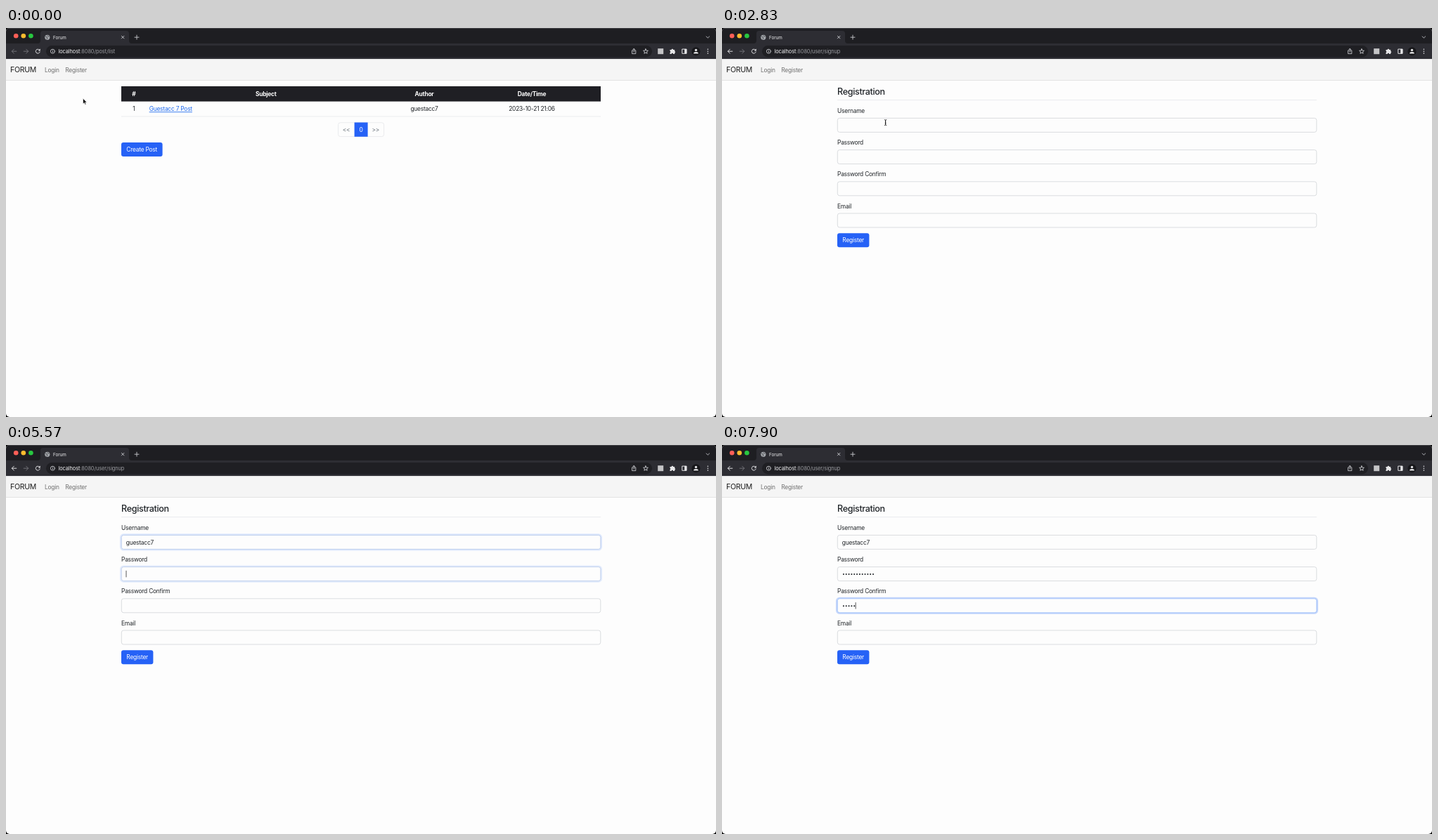
Recreate the animation shown at these times as an HTML page. Size 1010 by 554 pixels, loop 8 s.

```html
<!DOCTYPE html>
<html lang="en">
<head>
<meta charset="utf-8">
<title>Forum</title>
<style>
html, body { margin: 0; width: 100%; height: 100%; overflow: hidden; background: #000; }
svg { display: block; width: 1010px; height: 554px; }
text { font: 8.42px Inter, "Liberation Sans", sans-serif; letter-spacing: -.028em; fill: #212529; white-space: pre; }
.mid { text-anchor: middle; }
.head { font-weight: 700; fill: #fff; }
.ui { font-size: 6.3px; letter-spacing: 0; fill: #f1f1f3; }
.url { font-size: 7.36px; letter-spacing: -.01em; fill: #9b9ca1; }
.nav { fill: #717171; }
.brand { font-size: 10.52px; fill: #1c1c1c; }
.title { font-size: 12.6px; font-weight: 500; }
.btn { fill: #fff; }
.line { fill: none; stroke: #dee0e3; stroke-width: .6; }
.icon { fill: none; stroke: #c9cace; stroke-width: .9; stroke-linecap: round; stroke-linejoin: round; }
</style>
</head>
<body>
<svg viewBox="0 0 1010 554">
  <defs><clipPath id="win"><rect width="1010" height="554" rx="5"/></clipPath></defs>
  <g clip-path="url(#win)">
    <rect width="1010" height="554" fill="#fdfdfd"/>

    <!-- browser frame -->
    <rect width="1010" height="23" fill="#1e1e22"/>
    <path d="M4 .4H1006" stroke="#55565a" stroke-width=".8"/>
    <rect y="22" width="1010" height="22.3" fill="#2d2d33"/>
    <path d="M45 22q4 0 4-4V8q0-4 4-4h118q4 0 4 4v10q0 4 4 4z" fill="#2d2d33"/>
    <circle cx="14.2" cy="11.3" r="3.3" fill="#ff5f57"/>
    <circle cx="24.8" cy="11.3" r="3.3" fill="#febc2e"/>
    <circle cx="35.4" cy="11.3" r="3.3" fill="#28c840"/>
    <g id="globe">
      <circle cx="58.8" cy="13.3" r="3.6" fill="#a3a6ab"/>
      <path d="M56.2 12.2l2 .8.6 1.6-1 1.6M58.6 10.6l1.2 1.2 1.6.2" fill="none" stroke="#3a3b40" stroke-width=".9"/>
    </g>
    <text class="ui" x="67" y="15.5">Forum</text>
    <path class="icon" d="M164.4 11.3l3.6 3.6m0-3.6l-3.6 3.6" stroke="#fff"/>
    <path class="icon" d="M183 13.2h6m-3-3v6" stroke="#fff"/>
    <path class="icon" d="M996.2 12l2.2 2.2 2.2-2.2" stroke="#fff"/>
    <path class="icon" id="back" d="M14.8 33.2H8.4m2.9-3l-3 3 3 3"/>
    <path class="icon" d="M25.2 33.2h6.4m-2.9-3l3 3-3 3" style="stroke:#77787d"/>
    <g id="reload">
      <path class="icon" d="M47.6 31.2A3 3 0 1 0 48.2 34" style="stroke:#f0f0f2"/>
      <path d="M48.7 29.6v3h-3z" fill="#f0f0f2"/>
    </g>
    <path class="icon" id="stop" d="M42.6 30.5l5.2 5.2m0-5.2l-5.2 5.2" style="stroke:#f0f0f2"/>
    <rect x="57" y="25" width="862" height="16.4" rx="8.2" fill="#1f1f23"/>
    <circle class="icon" cx="66.4" cy="33.2" r="3" stroke-width=".7"/>
    <path class="icon" d="M66.4 33v1.6m0-3v.1" stroke-width=".7"/>
    <text class="url" x="74.5" y="35.8"><tspan fill="#f4f4f6">localhost</tspan><tspan id="path"></tspan></text>
    <path class="icon" d="M892 32h-1.4v4.6h5.2V32h-1.4M893.2 34.3v-4.8m-1.5 1.4l1.5-1.5 1.5 1.5" stroke-width=".7"/>
    <path class="icon" id="star" stroke-width=".7"/>
    <rect x="927.2" y="29.2" width="8" height="8" fill="#c4c4c6"/>
    <path d="M944.5 31h2.1a1.3 1.3 0 0 1 2.6 0h2v2a1.3 1.3 0 0 1 0 2.5V37h-2.1a1.2 1.2 0 0 0-2.4 0h-2.2v-2a1.2 1.2 0 0 0 0-2.2z" fill="#e6e6e8"/>
    <path d="M961.8 30.1h6.2v6.2h-6.2z" fill="none" stroke="#e6e6e8"/>
    <path d="M965.2 30h3v6.4h-3z" fill="#e6e6e8"/>
    <circle cx="981.5" cy="33.2" r="6" fill="#17171a"/>
    <circle cx="981.5" cy="31.4" r="1.7" fill="#e6e6e8"/>
    <path d="M978.2 36.6v-.6q0-2 3.3-2t3.3 2v.6z" fill="#e6e6e8"/>
    <g fill="#e6e6e8"><circle cx="998.4" cy="30.3" r=".8"/><circle cx="998.4" cy="33.2" r=".8"/><circle cx="998.4" cy="36.1" r=".8"/></g>

    <!-- site bar -->
    <rect y="44.3" width="1010" height="30" fill="#f5f5f5"/>
    <path d="M0 74.5H1010" stroke="#dcdcdc" stroke-width=".7"/>
    <text class="brand" x="6" y="63.3">FORUM</text>
    <text class="nav" x="55" y="62.5">Login</text>
    <text class="nav" id="link" x="84.3" y="62.5">Register</text>

    <g id="list">
      <rect x="164" y="83" width="682" height="21.6" fill="#1f1f24"/>
      <g class="mid">
        <text class="head" x="181.8" y="96.7">#</text>
        <text class="head" x="369.8" y="96.7">Subject</text>
        <text class="head" x="595" y="96.7">Author</text>
        <text class="head" x="748" y="96.7">Date/Time</text>
        <text x="181.8" y="118.3">1</text>
        <text x="595" y="118.3">guestacc7</text>
        <text x="748" y="118.3">2023-10-21 21:06</text>
      </g>
      <text x="203.7" y="118.3" style="fill:#1f6bf0;text-decoration:underline">Guestacc 7 Post</text>
      <path class="line" d="M164 126H846"/>
      <rect class="line" x="472.6" y="134.8" width="65" height="19.8" rx="3"/>
      <rect x="495.6" y="134.5" width="19" height="20.3" fill="#2662f6"/>
      <g class="mid">
        <text x="484" y="147.9" style="fill:#6c757d">&lt;&lt;</text>
        <text class="btn" x="505" y="147.9">0</text>
        <text x="525.8" y="147.9" style="fill:#6c757d">&gt;&gt;</text>
        <rect x="164" y="163" width="58.6" height="20" rx="3" fill="#2662f6"/>
        <text class="btn" x="193.2" y="176.1">Create Post</text>
      </g>
    </g>

    <g id="form">
      <text class="title" x="164" y="95.2">Registration</text>
      <path class="line" d="M164 102.6H846"/>
      <g id="fields"></g>
      <rect x="164" y="292.3" width="45.4" height="20" rx="3" fill="#2662f6"/>
      <text class="btn mid" x="186.7" y="305.4">Register</text>
      <text id="user" x="170.8" y="141.6"></text>
      <g id="dots" fill="#212529"></g>
      <path id="caret" stroke="#111" stroke-width=".7"/>
    </g>

    <g id="status">
      <path d="M0 543.6H86q2 0 2 2V554H0z" fill="#1f1f23"/>
      <text class="ui" x="2.4" y="551.2">localhost:8080/user/signup</text>
    </g>

    <g id="cursor" stroke-linejoin="round">
      <path id="arrow" d="M0 0V7.7L1.8 6.1 3 8.9 4.3 8.4 3.1 5.6H5.4Z" fill="#000" stroke="#fff" stroke-width=".6"/>
      <path id="hand" d="M-.9 .5Q0-.6 .8.5V3.3Q1.6 2.7 2.2 3.6 3 3 3.5 4 4.6 3.7 4.7 4.8V6.6Q4.6 7.8 3.8 9.3H-.3Q-1.2 7.4-2.5 6 -3 4.8-1.8 4.9L-.9 5.5Z" fill="#fff" stroke="#111" stroke-width=".7"/>
      <path id="beam" d="M-1.6-4Q0-4 0-3V3Q0 4-1.6 4M1.6-4Q0-4 0-3V3Q0 4 1.6 4M-.8 1H.8" fill="none" stroke="#111" stroke-width=".8"/>
    </g>
  </g>
</svg>
<script>
const LOOP = 8000, LOADING = 2300, LOADED = 2430, PITCH = 45.2, DOT = 3.83;
const NAME = 'guestacc7';
const $ = id => document.getElementById(id);
const show = (id, on) => { $(id).style.display = on ? '' : 'none'; };
const clamp = v => Math.max(0, Math.min(1, v));
const ease = v => (v = clamp(v), v * v * (3 - 2 * v));
const mix = (a, b, k) => a.map((v, i) => v + (b[i] - v) * k);
const rgb = c => `rgb(${c.map(Math.round)})`;
const add = (parent, tag, attrs) => {
  const el = document.createElementNS('http://www.w3.org/2000/svg', tag);
  for (const k in attrs) el.setAttribute(k, attrs[k]);
  return parent.appendChild(el);
};

const keys = [
  [4300, 4470, 4630, 4730, 4870, 4970, 5070, 5200, 5330],
  [5800, 5900, 6000, 6100, 6200, 6300, 6400, 6570, 6670, 6800, 6930, 7070],
  [7430, 7530, 7630, 7730, 7900]
];
const focusAt = [3200, 5500, 7270, Infinity];
// time, x, y of the pointer's hot spot
const track = [
  [1200, 109.6, 100.3], [1670, 99, 60.4], [2370, 99, 60.4],
  [2830, 232.6, 134.6], [3070, 236, 137], [3270, 236, 137], [3570, 250, 79.2]
];

const fields = ['Username', 'Password', 'Password Confirm', 'Email'].map((name, i) => {
  const y = 128.4 + i * PITCH, g = $('fields');
  add(g, 'text', { x: 164, y: 121 + i * PITCH }).textContent = name;
  const ring = add(g, 'rect', { x: 163, y: y - 1, width: 684, height: 22, rx: 4.2, fill: 'none', stroke: '#2a6df5', 'stroke-width': 2.1 });
  const box = add(g, 'rect', { x: 164.3, y: y, width: 681.5, height: 20, rx: 3, fill: '#fdfdfd', 'stroke-width': .7 });
  return { ring, box };
});
const dots = [1, 2].map(row => keys[row].map((_, k) =>
  add($('dots'), 'circle', { cx: 172.9 + k * DOT, cy: 138.8 + row * PITCH, r: 1.05 })));

$('star').setAttribute('d', 'M' + Array.from({ length: 10 }, (_, i) => {
  const r = i % 2 ? 1.6 : 3.6, a = i * Math.PI / 5;
  return `${910 + r * Math.sin(a)} ${33.4 - r * Math.cos(a)}`;
}).join('L') + 'Z');

function pointer(t) {
  if (t <= track[0][0]) return track[0].slice(1);
  for (let i = 1; i < track.length; i++) {
    const [t0, ...a] = track[i - 1], [t1, ...b] = track[i];
    if (t < t1) return mix(a, b, ease((t - t0) / (t1 - t0)));
  }
  return track[track.length - 1].slice(1);
}

function drawCursor(t, loaded) {
  const [x, y] = pointer(t);
  const hand = x > 80 && x < 120 && y > 49 && y < 70;
  const beam = loaded && x > 164 && y > 128 && y < 149;
  $('cursor').setAttribute('transform', `translate(${x} ${y})`);
  show('cursor', t < keys[0][0]);
  show('hand', hand);
  show('beam', beam);
  show('arrow', !hand && !beam);
  const hover = hand ? ease((t - 1480) / 150) : 0;
  $('link').style.fill = rgb(mix([113, 113, 113], [70, 70, 70], hover));
}

function drawForm(t) {
  fields.forEach(({ ring, box }, i) => {
    const k = i < 3 ? ease((t - focusAt[i]) / 150) - ease((t - focusAt[i + 1]) / 150) : 0;
    ring.setAttribute('stroke-opacity', .27 * k);
    box.setAttribute('stroke', rgb(mix([204, 207, 211], [134, 176, 250], k)));
  });
  const typed = keys.map(list => list.filter(k => k <= t).length);
  $('user').textContent = NAME.slice(0, typed[0]);
  dots.forEach((row, r) => row.forEach((d, k) => { d.style.display = k < typed[r + 1] ? '' : 'none'; }));

  const row = focusAt.filter(f => f <= t).length - 1;
  if (row < 0) return show('caret', false);
  const last = Math.max(focusAt[row], ...keys[row].filter(k => k <= t));
  const x = row ? 171 + typed[row] * DOT : 171 + (typed[0] ? $('user').getComputedTextLength() + .3 : 0);
  $('caret').setAttribute('d', `M${x} ${133.7 + row * PITCH}v9.4`);
  show('caret', (t - last) % 1000 < 500);
}

function render(t) {
  const loaded = t >= LOADED, busy = t >= LOADING && !loaded;
  show('list', !loaded);
  show('form', loaded);
  show('globe', !busy);
  show('reload', !busy);
  show('stop', busy);
  $('back').style.stroke = loaded ? '#f0f0f2' : '#77787d';
  $('path').textContent = loaded ? ':8080/user/signup' : ':8080/post/list';
  $('status').style.opacity = loaded ? 1 - clamp((t - LOADED - 60) / 150) : clamp((t - 1870) / 200);
  if (loaded) drawForm(t);
  drawCursor(t, loaded);
}

const start = performance.now();
function tick() {
  render((performance.now() - start) % LOOP);
  requestAnimationFrame(tick);
}
render(0);
requestAnimationFrame(tick);
</script>
</body>
</html>
```
